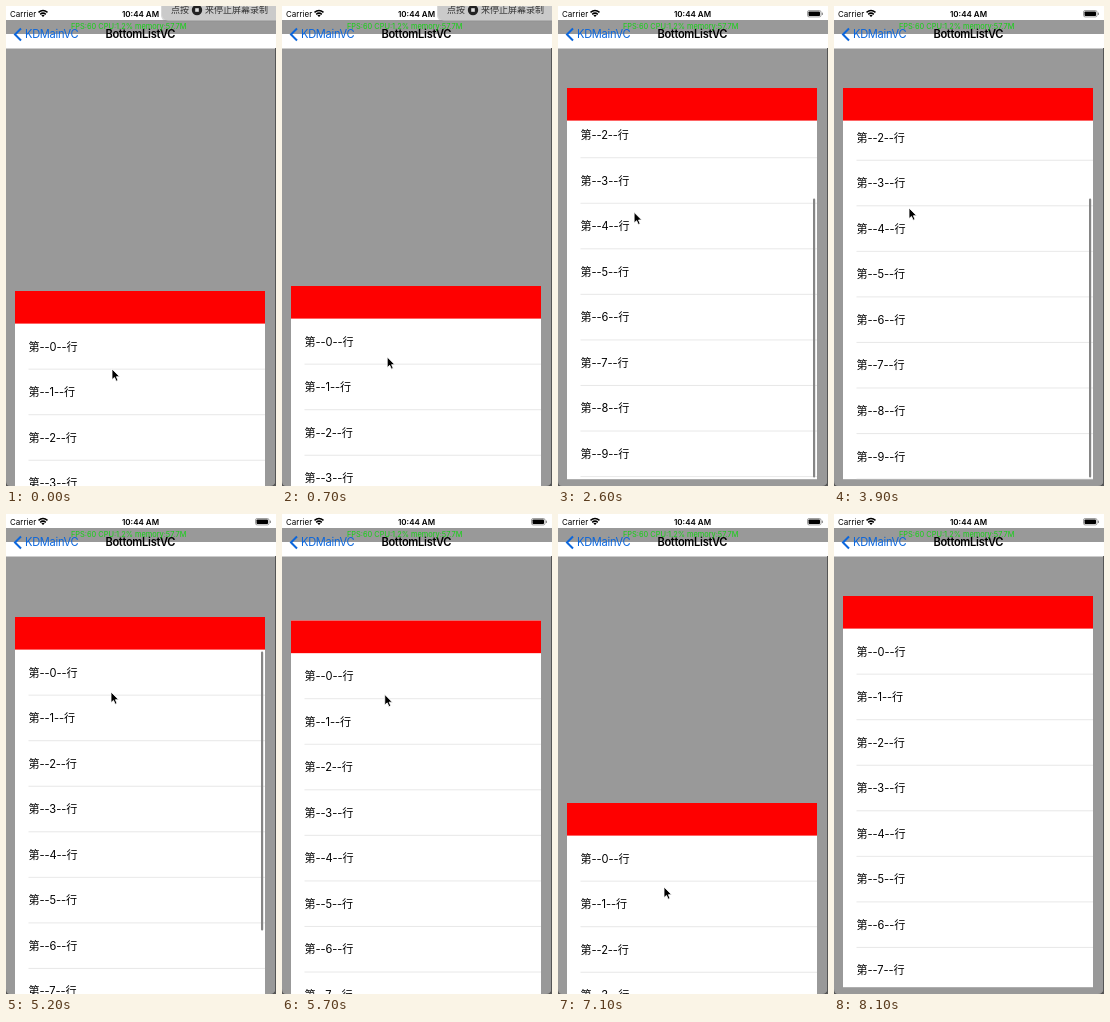
These frames come from a looping animation (270 by 480 pixels, 8200 ms). An HTML page:

```html
<!DOCTYPE html>
<html lang="zh">
<head>
<meta charset="utf-8">
<style>
html, body { margin: 0; width: 100%; height: 100%; overflow: hidden; background: #999; }
svg { display: block; width: 270px; height: 480px; font-family: Inter, "Noto Sans CJK SC", "Noto Sans CJK", sans-serif; }
.nav { font-size: 11.1px; letter-spacing: -.3px; }
.status { font-size: 8px; }
.row { font-size: 11.1px; letter-spacing: -.1px; }
</style>
</head>
<body>
<svg viewBox="0 0 270 480">
  <defs>
    <clipPath id="listClip"><rect x="9" y="32.6" width="250" height="358.6"/></clipPath>
  </defs>
  <rect width="270" height="480" fill="#999"/>
  <rect width="270" height="14" fill="#fff"/>
  <rect y="28" width="270" height="14.5" fill="#fff"/>

  <g class="status">
    <text x="4" y="10.7">Carrier</text>
    <text x="134.5" y="10.7" text-anchor="middle" font-weight="600">10:44 AM</text>
  </g>
  <g fill="none" stroke="#000" stroke-width="1.5">
    <path d="M32.5 6.3Q37 2.6 41.5 6.3M34.2 8.3Q37 6 39.8 8.3"/>
  </g>
  <path d="M35.4 9.4Q37 8.2 38.6 9.4L37 11Z"/>
  <rect x="249.5" y="4.5" width="13.5" height="6.4" rx="1.6" fill="none" stroke="#777" stroke-width=".7"/>
  <rect x="250.5" y="5.4" width="11.5" height="4.6" rx=".8"/>
  <rect x="263.8" y="6.5" width="1" height="2.4" rx=".5" fill="#777"/>

  <path d="M15 22.5L9 28.5L15 34.5" fill="none" stroke="#0b66dc" stroke-width="2"/>
  <g class="nav">
    <text x="19" y="32.4" fill="#0b66dc">KDMainVC</text>
    <text x="134.3" y="32.4" text-anchor="middle" font-weight="600">BottomListVC</text>
  </g>
  <text x="65" y="23.4" font-size="7.4" textLength="" fill="#12d312">FPS:60 CPU:1.2% memory:57.7M</text>

  <g id="sheet">
    <rect x="9" width="250" height="391.2" fill="#fff"/>
    <g clip-path="url(#listClip)"><g id="rows" class="row"></g></g>
    <rect x="9" width="250" height="32.6" fill="#fe0000"/>
    <rect id="bar" x="255" width="2.2" height="279" rx="1.1" fill="#858585"/>
  </g>

  <path d="M269.5 42V480" stroke="#555"/>
  <path d="M0 475Q0 480 4 480H0ZM270 474Q269 480 264 480H270Z" fill="#555"/>

  <g id="notice">
    <path d="M155 0H270V16H161Q156 15 155 10Z" fill="#8e8e8e" opacity=".35"/>
    <path d="M156 0H270V14.5H162Q157 14 156 9Z" fill="#cacaca"/>
    <g font-size="9" fill="#333">
      <text x="165" y="7.4">点按</text>
      <text x="199" y="7.4">来停止屏幕录制</text>
    </g>
    <circle cx="191" cy="4" r="5.2" fill="#222"/>
    <rect x="189.2" y="2.2" width="3.6" height="3.6" fill="#ddd"/>
  </g>

  <path id="pointer" d="M0 0V10.6L2.5 8.4L4.2 12.2L6 11.4L4.4 7.7H7.6Z" stroke="#fff" stroke-width=".8"/>
</svg>
<script>
const LOOP = 8200, STEP = 100, HEAD = 32.6, ROW = 45.55, MAX_SCROLL = 97;
const $ = id => document.getElementById(id);

// Each key: [ms, value, ...]
const sheetTop = [[0, 285], [300, 289], [700, 280], [1000, 225], [1300, 80], [1500, 83], [1700, 82],
  [4300, 82], [4500, 92], [4700, 82], [5200, 103], [5600, 110], [6100, 77], [6300, 82], [6500, 84],
  [7100, 289], [7400, 286], [7900, 80], [8100, 82]];
const scroll = [[1900, 0], [2700, 104], [3000, MAX_SCROLL], [3900, MAX_SCROLL], [4400, 0]];
const pointer = [[0, 106, 363], [600, 106, 360], [1000, 101, 302], [1900, 101, 302], [2700, 75, 202],
  [3900, 75, 202], [4400, 85, 285], [4700, 103, 156], [5200, 105, 178], [5600, 104, 184],
  [6100, 92, 150], [6400, 92, 156], [7100, 106, 373], [7400, 106, 370], [7800, 104, 300]];
const barFade = [[1900, 0], [2000, 1], [5300, 1], [5600, 0]];
const noticeFade = [[1500, 1], [1900, 0]];

function at(keys, t) {
  if (t <= keys[0][0]) return keys[0].slice(1);
  const i = keys.findIndex(k => k[0] > t);
  if (i < 0) return keys[keys.length - 1].slice(1);
  const a = keys[i - 1], b = keys[i];
  const u = (t - a[0]) / (b[0] - a[0]);
  const e = u * u * (3 - 2 * u);
  return a.slice(1).map((v, n) => v + (b[n + 1] - v) * e);
}

$("rows").innerHTML = Array.from({ length: 10 }, (_, i) => {
  const y = HEAD + i * ROW;
  return `<text x="22.5" y="${y + 27}">第--${i}--行</text>` +
    `<path d="M22.5 ${y + ROW}H259" stroke="#dedede" stroke-width=".7"/>`;
}).join("");

const move = (id, x, y) => $(id).setAttribute("transform", `translate(${x} ${y})`);

function draw(time) {
  const t = Math.floor(time % LOOP / STEP) * STEP;
  const [offset] = at(scroll, t);
  move("sheet", 0, at(sheetTop, t)[0]);
  move("rows", 0, -offset);
  move("pointer", ...at(pointer, t));
  $("bar").setAttribute("y", HEAD + 2 + Math.min(offset / MAX_SCROLL, 1) * 76);
  $("bar").setAttribute("opacity", at(barFade, t)[0]);
  $("notice").setAttribute("opacity", at(noticeFade, t)[0]);
  $("pointer").setAttribute("opacity", t < 7800 ? 1 : 0);
}

const start = performance.now();
function tick() {
  draw(performance.now() - start);
  requestAnimationFrame(tick);
}
tick();
</script>
</body>
</html>
```
